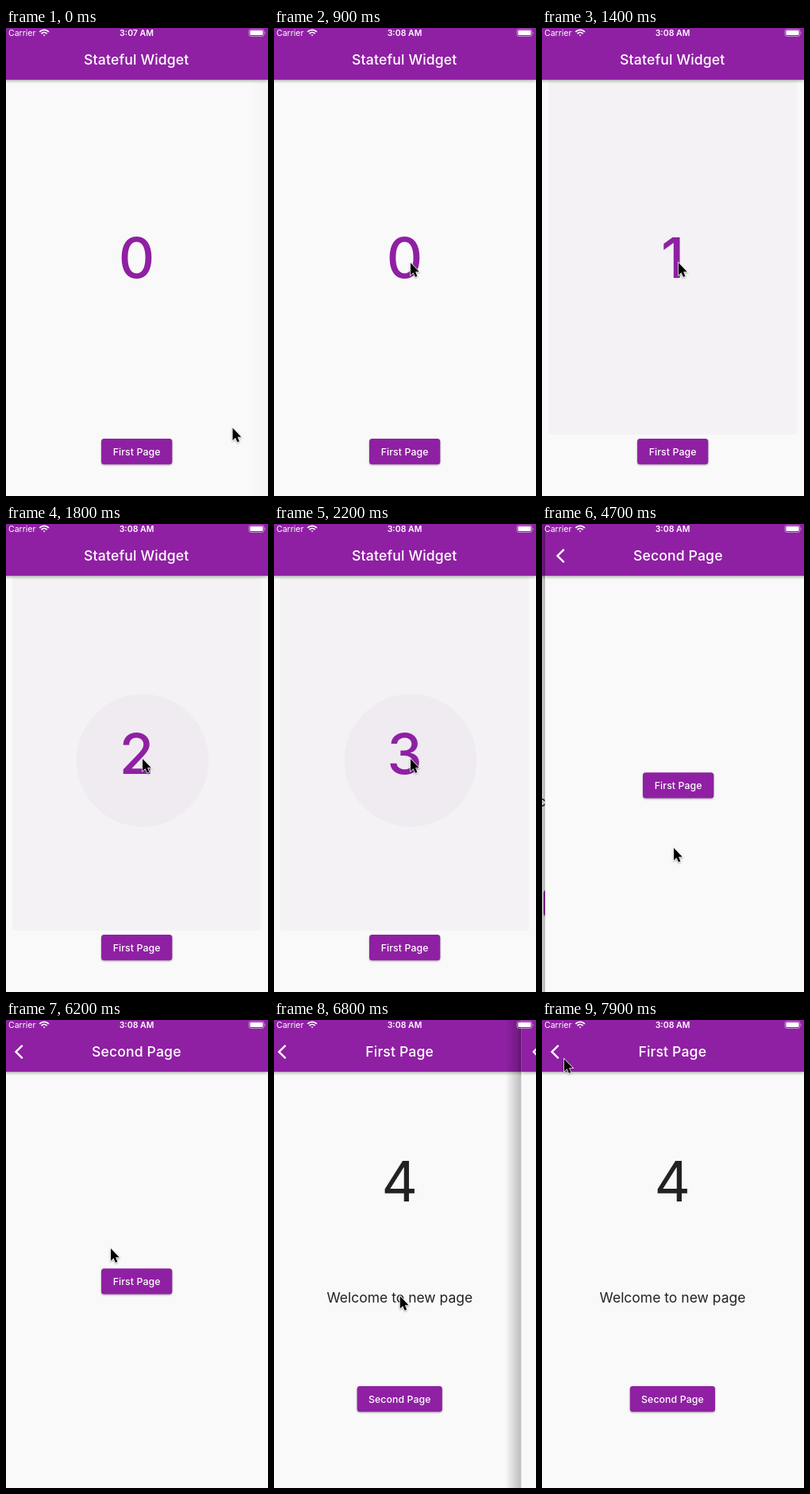
These frames come from a looping animation (330x588 px, 8000 ms). An HTML page:

```html
<!DOCTYPE html>
<html lang="en">
<head>
<meta charset="utf-8">
<title>Counter app</title>
<style>
  html, body { margin: 0; height: 100%; overflow: hidden; background: #f9f9f9; }
  svg { display: block; width: 330px; height: 588px; }
  text { font-family: Inter, sans-serif; }
  .mid { text-anchor: middle; }
  .title { font-size: 17.6px; font-weight: 500; letter-spacing: .15px; fill: #fff; }
  .label { font-size: 12.3px; font-weight: 500; letter-spacing: .1px; fill: #fff; }
  .digit { font-size: 70.4px; }
  .status { font-size: 10.5px; fill: #fff; }
  .button { filter: drop-shadow(0 1.5px 1.2px #0005); }
  .bar { filter: drop-shadow(0 1.5px 2px #0006); }
  #cursor { filter: drop-shadow(0 1px 1px #0005); }
</style>
</head>
<body>
<svg id="stage" viewBox="0 0 330 588"></svg>
<script>
const PURPLE = '#8f20a3', LOOP = 8000, WIDTH = 330;
const $ = id => document.getElementById(id);

const text = (x, y, cls, content, extra = '') =>
  `<text x="${x}" y="${y}" class="mid ${cls}" ${extra}>${content}</text>`;

const button = (x, y, w, content) =>
  `<rect class="button" x="${x}" y="${y}" width="${w}" height="32.3" rx="3.5" fill="${PURPLE}"/>` +
  text(x + w / 2, y + 20.5, 'label', content);

const page = (id, title, body, pushed = true) => `<g id="${id}">
  ${pushed ? '<rect x="-23" width="20" height="588" fill="url(#edge)"/>' : ''}
  <rect x="-3" width="333" height="588" fill="#f9f9f9"/>
  ${body}
  <rect class="bar" x="-3" width="333" height="65" fill="${PURPLE}"/>
  ${text(164.3, 46.2, 'title', title)}
  ${pushed ? '<path d="M20.7 31.8L12.5 40l8.2 8.2" fill="none" stroke="#fff" stroke-width="2.4"/>' : ''}
</g>`;

$('stage').innerHTML = `
  <defs>
    <linearGradient id="edge"><stop stop-opacity="0"/><stop offset="1" stop-opacity=".25"/></linearGradient>
    <linearGradient id="fade"><stop stop-opacity="0"/><stop offset="1" stop-opacity=".02"/></linearGradient>
    <clipPath id="card"><rect x="8" y="65" width="313" height="446"/></clipPath>
  </defs>
  ${page('home', 'Stateful Widget', `
    <rect id="leftover" x="304" y="65" width="26" height="523" fill="url(#fade)"/>
    <g clip-path="url(#card)" fill="#6e288c">
      <rect id="highlight" x="8" y="65" width="313" height="446"/>
      <circle id="splash" cx="172" cy="297"/>
    </g>
    ${text(164.5, 313.6, 'digit', 0, `id="count" font-weight="500" fill="${PURPLE}"`)}
    ${button(120, 516, 89.3, 'First Page')}`, false)}
  ${page('first', 'First Page', `
    ${text(164.3, 227.6, 'digit', 4, 'fill="#222"')}
    ${text(164.5, 355.3, '', 'Welcome to new page', 'font-size="17.5" fill="#222"')}
    ${button(110.8, 460, 107.2, 'Second Page')}`)}
  ${page('second', 'Second Page', button(120, 312.3, 89.3, 'First Page'))}
  <text x="3" y="10" class="status">Carrier</text>
  <g fill="none" stroke="#fff" stroke-width="1.9">
    <path d="M42.3 4.8a8.2 8.2 0 0 1 11.6 0M44.5 7.1a5.1 5.1 0 0 1 7.2 0"/>
    <path d="M46.4 8.4h3.4l-1.7 1.9z" fill="#fff" stroke="none"/>
    <rect x="306" y="1.7" width="19" height="8.8" rx="2.6" stroke-width=".8" stroke-opacity=".6"/>
    <rect x="307.4" y="3.1" width="16.2" height="6" rx="1.4" fill="#fff" stroke="none"/>
    <path d="M326.3 4.7q1.6 1.4 0 2.8z" fill="#fff" stroke="none" opacity=".6"/>
  </g>
  ${text(164.5, 10, 'status', '', 'id="clock" font-weight="600"')}
  <path id="cursor" d="M0 0V15.4L3.5 12.2 5.9 17.8 8.4 16.7 6.1 11.2H10.8Z"
    stroke="#fff" stroke-width="1.4" paint-order="stroke"/>`;

// Pointer stops: time, x, y
const stops = [
  [0, 285.5, 502.5], [400, 190, 516], [900, 172, 295], [2500, 172, 295], [2800, 166, 508],
  [3000, 162.5, 525.5], [3300, 162.5, 525.5], [4000, 157, 431], [4300, 167, 473],
  [4500, 167, 473], [4700, 166, 407], [5300, 156, 329], [5800, 43, 67], [6200, 132, 287],
  [6400, 153, 326], [6700, 153, 326], [7100, 190, 461], [7700, 18.5, 33.5], [7900, 28, 49]
];
const taps = [1100, 1650, 2050, 2400];
const clamp = (v, lo = 0, hi = 1) => Math.min(hi, Math.max(lo, v));
const move = (id, x, y = 0) => $(id).setAttribute('transform', `translate(${x} ${y})`);

function pointer(t) {
  const i = stops.findIndex(s => s[0] > t);
  if (i < 0) return stops.at(-1).slice(1);
  const [t0, x0, y0] = stops[i - 1], [t1, x1, y1] = stops[i];
  const u = (t - t0) / (t1 - t0), k = u * u * (3 - 2 * u);
  return [x0 + (x1 - x0) * k, y0 + (y1 - y0) * k];
}

// Left edge of a page that is pushed in, and later popped out again
function slide(t, push, pop = Infinity) {
  if (t < push) return 400;
  if (t < pop) {
    const x = 54 * Math.exp((push - t) / 98);
    return x < .4 ? 0 : x;
  }
  const x = WIDTH * (1 - Math.exp((pop - t) / 98));
  return x > 326 ? 400 : x;
}
const parallax = x => -(WIDTH - clamp(x - 3, 0, WIDTH)) / 3;

function draw(t) {
  const first = slide(t, 3300), second = slide(t, 4500, 6500);
  move('home', first > WIDTH ? 0 : parallax(first));
  move('first', second > WIDTH ? first : parallax(second));
  move('second', second);
  move('cursor', ...pointer(t));

  const since = t - (taps.findLast(tap => tap <= t) ?? -LOOP);
  const rise = t < 1500 ? clamp((since + 50) / 100) : 1;
  $('highlight').setAttribute('opacity', .03 * rise * clamp((600 - since) / 250));
  $('splash').setAttribute('r', since < 600 ? since * .555 : 0);
  $('splash').setAttribute('opacity', .03 * clamp((300 - since) / 150));
  $('leftover').setAttribute('opacity', t < 100 ? 1 : 0);
  $('count').textContent = taps.filter(tap => tap + 100 <= t).length;
  $('clock').textContent = t < 500 ? '3:07 AM' : '3:08 AM';
}

function frame() {
  const t = performance.now() % LOOP;
  draw(Math.floor(t / 100) * 100); // ten pictures per second
  requestAnimationFrame(frame);
}
frame();
</script>
</body>
</html>
```
